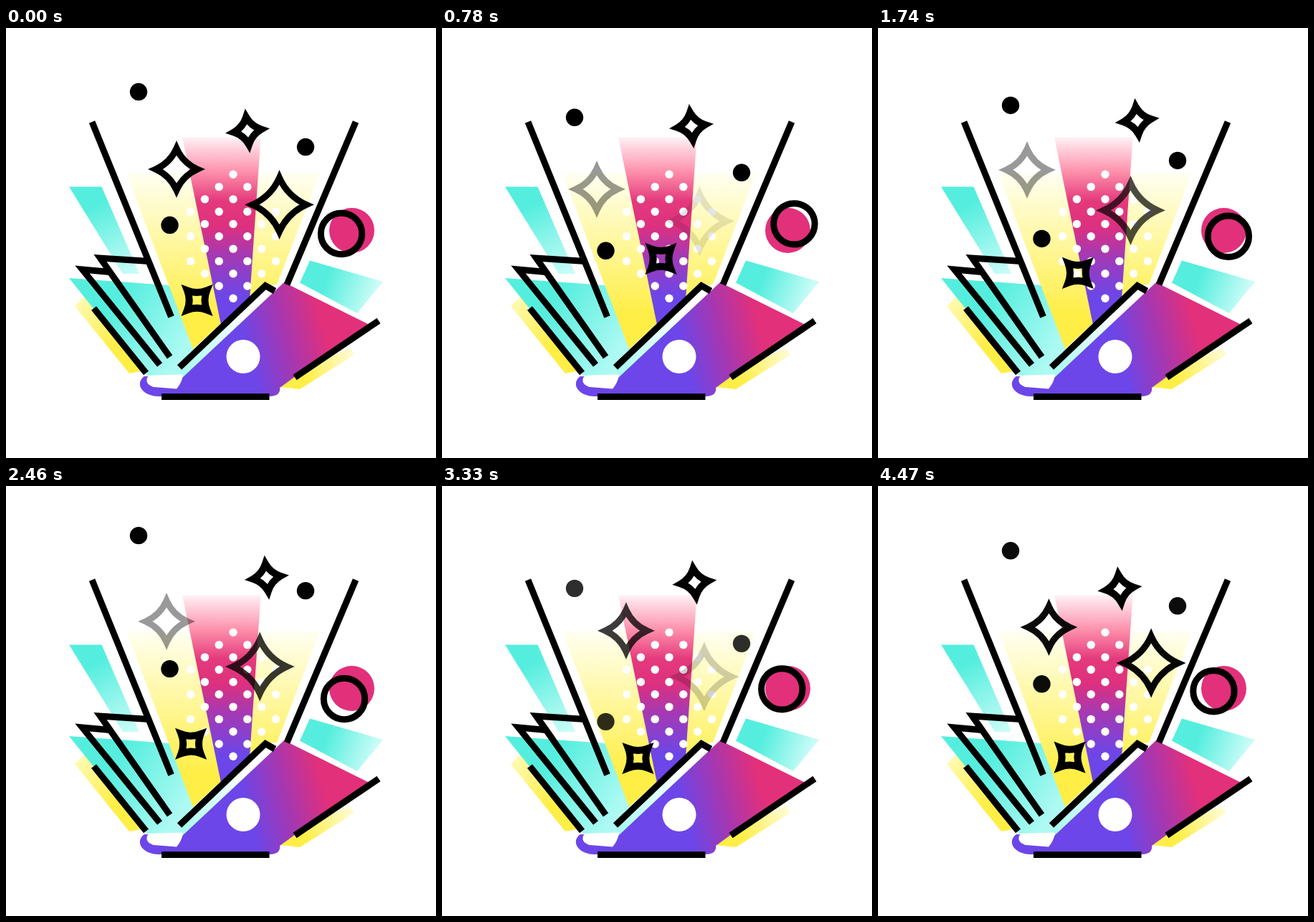
An HTML page for the animation above (4.5 s loop, 600 by 600 pixels).

```html
<!DOCTYPE html>
<html>
<head>
<meta charset="utf-8">
<style>
html, body { margin: 0; width: 100%; height: 100%; overflow: hidden; background: #fff; }
svg { display: block; width: 100vw; height: 100vh; }
.ink { fill: none; stroke: #000; stroke-width: 9; stroke-miterlimit: 8; }
.small { stroke-width: 10; }
</style>
</head>
<body>
<svg viewBox="0 0 600 600">
  <defs>
    <linearGradient id="pink" gradientUnits="userSpaceOnUse" x1="0" y1="152" x2="0" y2="400">
      <stop offset="0" stop-color="#fff2f6"/>
      <stop offset=".2" stop-color="#fd8eaa"/>
      <stop offset=".36" stop-color="#e43a7c"/>
      <stop offset=".5" stop-color="#de307e"/>
      <stop offset=".66" stop-color="#a639b2"/>
      <stop offset=".9" stop-color="#6c46e8"/>
    </linearGradient>
    <linearGradient id="beam" gradientUnits="userSpaceOnUse" x1="0" y1="203" x2="0" y2="400">
      <stop offset="0" stop-color="#fffff2"/>
      <stop offset=".5" stop-color="#fff79c"/>
      <stop offset="1" stop-color="#ffee46"/>
    </linearGradient>
    <linearGradient id="cyanTop" gradientUnits="userSpaceOnUse" x1="110" y1="235" x2="170" y2="345">
      <stop offset=".15" stop-color="#55eede"/>
      <stop offset="1" stop-color="#c8fcf7"/>
    </linearGradient>
    <linearGradient id="cyanLow" gradientUnits="userSpaceOnUse" x1="130" y1="380" x2="245" y2="455">
      <stop offset=".15" stop-color="#55eede"/>
      <stop offset="1" stop-color="#aefaf3"/>
    </linearGradient>
    <linearGradient id="cyanRight" gradientUnits="userSpaceOnUse" x1="420" y1="340" x2="512" y2="374">
      <stop offset=".3" stop-color="#55eede"/>
      <stop offset="1" stop-color="#c8fcf7"/>
    </linearGradient>
    <linearGradient id="strip" gradientUnits="userSpaceOnUse" x1="248" y1="480" x2="335" y2="398">
      <stop offset="0" stop-color="#a8f9f0"/>
      <stop offset="1" stop-color="#fff"/>
    </linearGradient>
    <linearGradient id="yellowL" gradientUnits="userSpaceOnUse" x1="102" y1="382" x2="150" y2="445">
      <stop offset="0" stop-color="#fffab0"/>
      <stop offset="1" stop-color="#ffee46"/>
    </linearGradient>
    <linearGradient id="yellowR" gradientUnits="userSpaceOnUse" x1="400" y1="500" x2="484" y2="450">
      <stop offset=".2" stop-color="#ffee46"/>
      <stop offset="1" stop-color="#fffcd8"/>
    </linearGradient>
    <linearGradient id="cover" gradientUnits="userSpaceOnUse" x1="315" y1="446" x2="442" y2="412">
      <stop offset=".15" stop-color="#6c46e8"/>
      <stop offset=".58" stop-color="#a637b0"/>
      <stop offset="1" stop-color="#e2307a"/>
    </linearGradient>
  </defs>

  <path fill="url(#cyanTop)" d="M88 221.500H133.500L186 343H163Z"/>
  <path fill="url(#yellowL)" d="M112 372L194 478L172 482L96 388Z"/>
  <path fill="url(#cyanLow)" d="M88 349L228 359L264 447L250 484L197 485Z"/>
  <path fill="url(#beam)" d="M168 203H257L300 412L261 448Z"/>
  <path fill="url(#beam)" d="M352 203H438L378 358L338 380Z"/>
  <path fill="url(#pink)" d="M246 152.500H355.500L340 378L300 414Z"/>
  <g id="grid" fill="#fff"></g>
  <path fill="url(#strip)" d="M242 473L362 360L390 356L248 492Z"/>
  <path fill="url(#cyanRight)" d="M424 324.500L526 354L490 398L410 355.500Z"/>
  <path fill="url(#yellowR)" d="M382 501L404 482L480 446L486 456L410 504Z"/>
  <path fill="url(#cover)" d="M388 355L507 414L404 486L382 502Q384 514 366 514H212C188 513 180 495 193 486L246 488Z"/>
  <path fill="#fff" d="M200 485L247 483.500Q246 494 238 503.500L207 501Q194 498 197 488Z"/>
  <circle cx="331" cy="458.500" r="23.500" fill="#fff"/>

  <g class="ink">
    <path d="M120 131L230.500 403M488 131L392 358M122.500 391L195.500 481.500"/>
    <path d="M214.500 470L106.500 337L145 340.500"/>
    <path d="M228.500 459L131.500 321L200 325.500"/>
    <path d="M242 473.500L362 359.500L375 367"/>
    <path d="M520 408.500L403 487.500M217 514.500H367.500"/>
  </g>

  <circle cx="482.500" cy="282.500" r="31.500" fill="#e2307a"/>
  <circle id="ring" class="ink" r="28.700"/>
  <g id="dots">
    <circle cx="185" cy="89" r="12.200"/>
    <circle cx="418" cy="166" r="12.200"/>
    <circle cx="228.500" cy="275" r="12.200"/>
  </g>
  <g id="mid"><path class="ink"/></g>
  <g id="big"><path class="ink"/></g>
  <g id="top"><path class="ink small" transform="rotate(-6)"/></g>
  <g id="low"><path class="ink small" transform="rotate(45)"/></g>
</svg>
<script>
const LOOP = 4500;
const el = id => document.getElementById(id);

// Four-pointed star with tips at r and hollow sides
function star(id, r) {
  const c = r * 0.31;
  el(id).firstChild.setAttribute('d',
    `M0 ${-r}Q${c} ${-c} ${r} 0Q${c} ${c} 0 ${r}Q${-c} ${c} ${-r} 0Q${-c} ${-c} 0 ${-r}Z`);
}
star('mid', 29);
star('big', 37.5);
star('top', 19);
star('low', 19);

// Hexagonal field of white dots
let grid = '';
for (let row = 0; row < 11; row++) {
  const n = Math.min(row + 1, 11 - row, 4 - row % 2 + (row % 2) * 0) - 0;
  const count = n < 3 ? n : 3 + row % 2;
  for (let i = 0; i < count; i++) {
    const x = 317 + (i - (count - 1) / 2) * 39.6;
    grid += `<circle cx="${x}" cy="${204.3 + row * 17.3}" r="5.7"/>`;
  }
}
el('grid').innerHTML = grid;

// Turning points: time, x, y and, where it blinks, opacity
const moves = {
  dots: [[0, 0, 0, 1], [1200, 0, 55, 1], [2400, 0, -25, 1], [3333, 0, 54, 0.82], [3930, 0, 26, 0.1]],
  ring: [[0, 468, 287], [800, 492, 273], [1650, 491, 290], [2460, 472, 297], [3990, 476, 273]],
  mid: [[0, 238, 197, 1], [780, 216, 225, 0.4], [1740, 208, 198, 0.4], [2460, 224, 189, 0.4],
    [3333, 257, 202, 0.77], [3930, 247, 199, 0.12]],
  big: [[0, 381.5, 246.5, 1], [830, 358, 271, 0.05], [2150, 350, 247, 1], [3450, 367.5, 268, 0.1]],
  top: [[0, 337, 143.5], [2170, 367.7, 125.5]],
  low: [[0, 266.5, 380], [820, 307.5, 319], [2430, 257.5, 359], [3333, 273.5, 380], [3917, 287.6, 351.5]]
};

// Linear travel between turning points, back to the first at the loop's end
function at(keys, t) {
  const i = keys.findLastIndex(k => k[0] <= t);
  const [t0, ...a] = keys[i];
  const [t1, ...b] = keys[i + 1] || [LOOP, ...keys[0].slice(1)];
  return a.map((v, n) => v + (b[n] - v) * (t - t0) / (t1 - t0));
}

function draw(t) {
  for (const id in moves) {
    const [x, y, alpha = 1] = at(moves[id], t);
    el(id).setAttribute('transform', `translate(${x} ${y})`);
    el(id).setAttribute('opacity', alpha);
  }
}

function tick() {
  draw(performance.now() % LOOP);
  requestAnimationFrame(tick);
}
tick();
</script>
</body>
</html>
```
